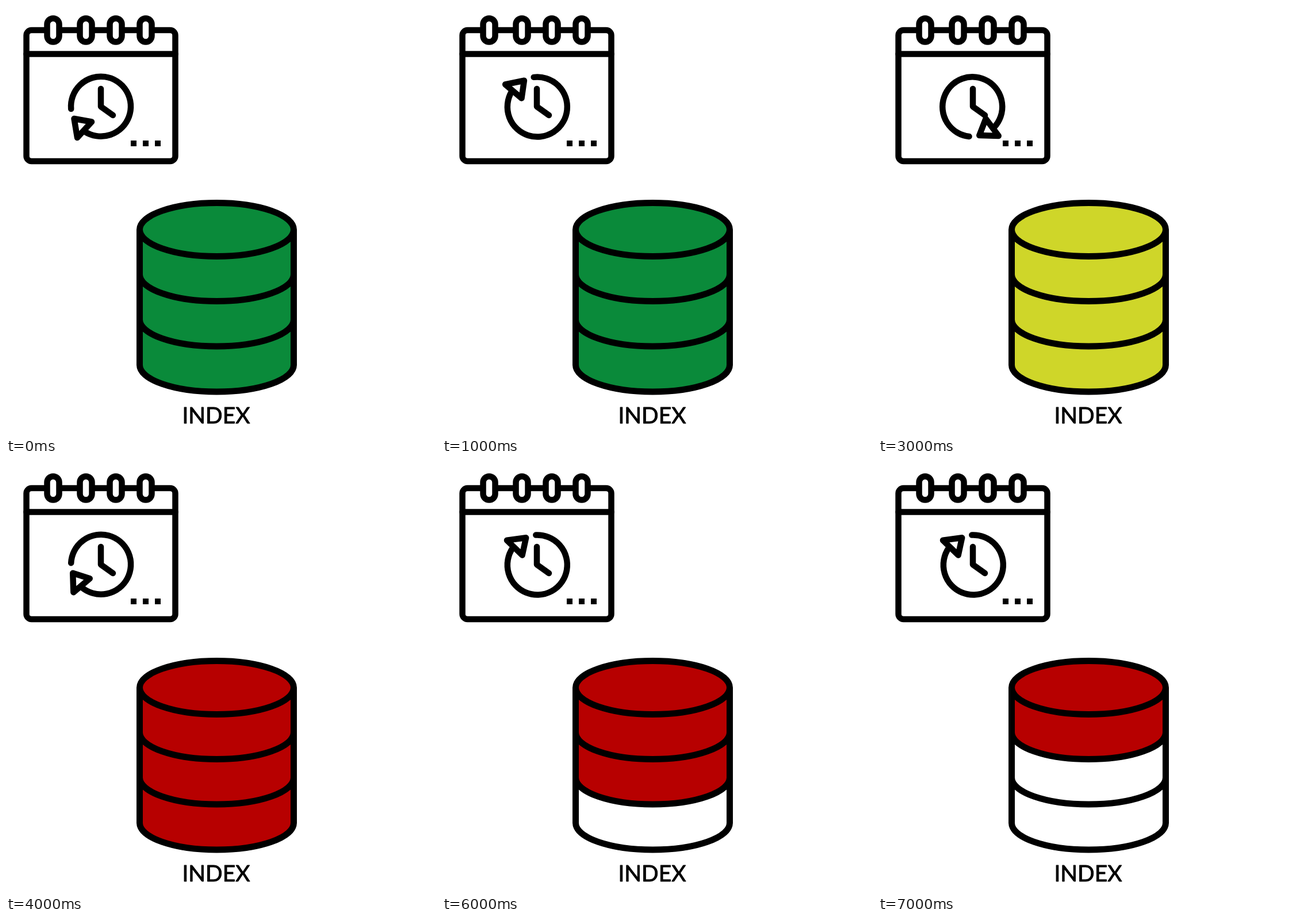
An HTML page that plays this animation: 748 px wide and 748 px high, repeating every 8 s.

```html
<!DOCTYPE html>
<html lang="en">
<head>
<meta charset="utf-8">
<title>Index lifecycle</title>
<style>
  html, body { margin: 0; width: 100%; height: 100%; overflow: hidden; background: #fff; }
  svg { display: block; width: 100vw; height: 100vh; }
  .line { fill: none; stroke: #000; stroke-width: 10.5; stroke-linecap: round; stroke-linejoin: round; }
  .drum { stroke-width: 11; stroke-linecap: butt; }
  text { font: 39px Lato, sans-serif; stroke: #000; stroke-width: .9; stroke-linejoin: round; }
</style>
</head>
<body>
<svg viewBox="0 0 748 748">
  <g class="line">
    <rect x="35.5" y="42" width="259" height="228" rx="9"/>
    <path d="M35.5 83.5H294.5"/>
    <g id="rings" fill="#fff"></g>
    <path d="M165 144V175L186 190"/>
    <g id="arrow">
      <path d="M113.2 179A52 52 0 1 1 137 218.5"/>
      <path fill="#fff" d="M118.5 196L149 201.5L124 229Z"/>
    </g>
  </g>
  <path d="M217 234h10v10h-10zM238 234h10v10h-10zM259 234h10v10h-10z"/>
  <g id="fills"></g>
  <g id="edges" class="line drum"></g>
  <text x="365.5" y="726" text-anchor="middle">INDEX</text>
</svg>
<script>
const $ = id => document.getElementById(id);
const add = (parent, tag, attrs) => {
  const el = document.createElementNS('http://www.w3.org/2000/svg', tag);
  for (const key in attrs) el.setAttribute(key, attrs[key]);
  return parent.appendChild(el);
};

for (const x of [82, 139, 191, 243])
  add($('rings'), 'rect', { x: x - 10.5, y: 21.5, width: 21, height: 41, rx: 10.5 });

// Cylinder: lid ellipse plus three bands between matching lower arcs
const L = 232.5, R = 500.5, RX = 134, RY = 46.5;
const levels = [389, 467, 545.5, 624.5];
const arc = (x, sweep) => `A${RX} ${RY} 0 0 ${sweep} ${x} `;
const lid = { cx: 366.5, cy: levels[0], rx: RX, ry: RY };

const parts = [add($('fills'), 'ellipse', lid)];
add($('edges'), 'ellipse', lid);
for (let i = 1; i < levels.length; i++) {
  const top = levels[i - 1], low = levels[i];
  parts.push(add($('fills'), 'path', {
    d: `M${L} ${top}${arc(R, 0)}${top}V${low}${arc(L, 1)}${low}Z`
  }));
  add($('edges'), 'path', { d: `M${L} ${top}V${low}${arc(R, 0)}${low}V${top}` });
}

const GREEN = '#0a8a3a', YELLOW = '#cfd629', RED = '#b70000';
const LOOP = 8000, STEP = 1000;
// Per second: arrow turn, colour, number of filled parts
const steps = [
  [0, GREEN, 4], [88, GREEN, 4], [180, YELLOW, 4], [281, YELLOW, 4],
  [367.5, RED, 4], [452, RED, 4], [452, RED, 3], [452, RED, 2]
];

function draw(ms) {
  const [turn, color, count] = steps[Math.floor(ms % LOOP / STEP)];
  $('arrow').setAttribute('transform', `rotate(${turn} 165 175.5)`);
  parts.forEach((part, i) => part.setAttribute('fill', i < count ? color : '#fff'));
}

const start = performance.now();
function tick() {
  draw(performance.now() - start);
  requestAnimationFrame(tick);
}
tick();
</script>
</body>
</html>
```
